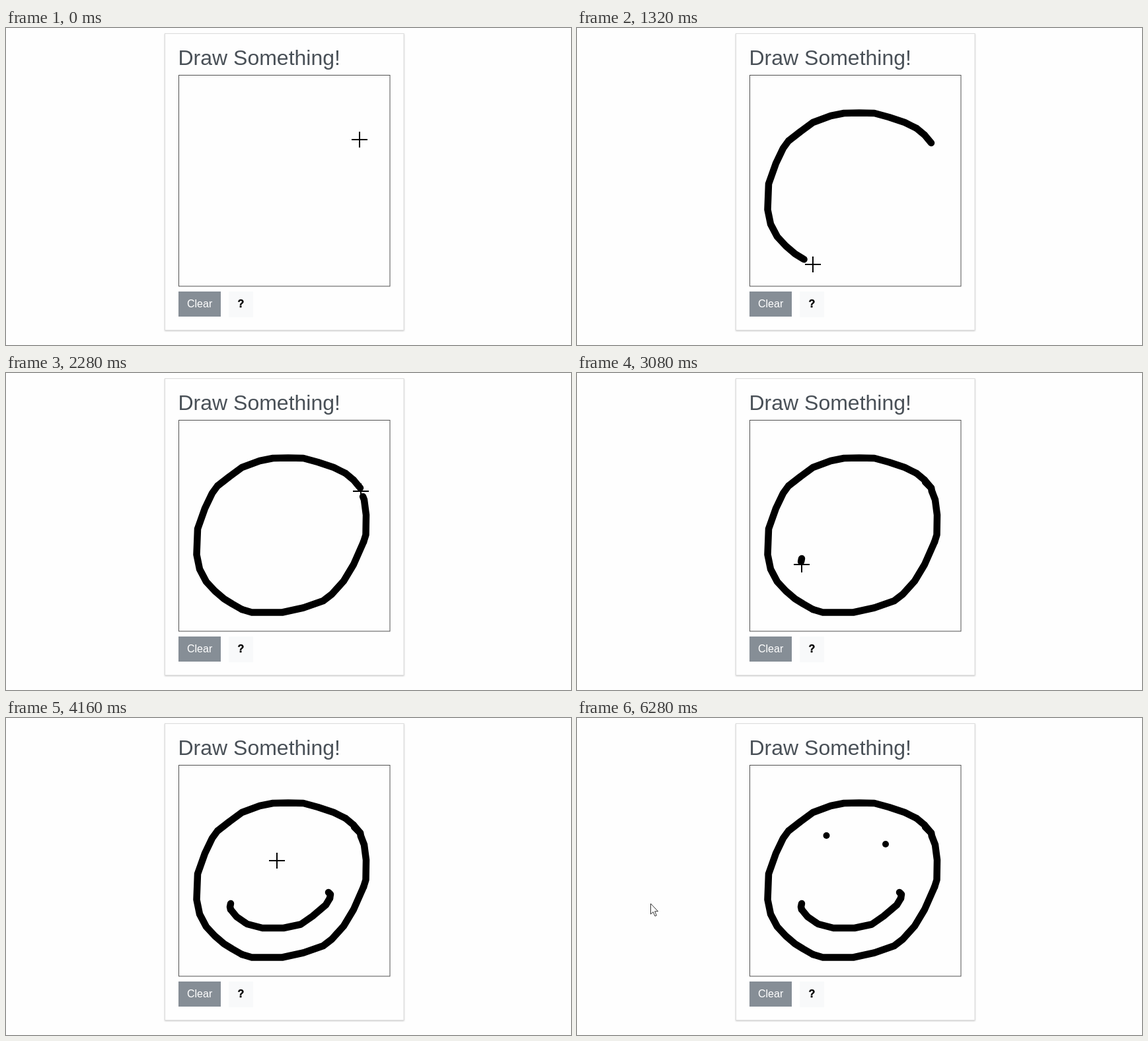
These frames come from a looping animation (855 px wide and 480 px high, 6320 ms). An HTML page:

```html
<!DOCTYPE html>
<html lang="en">
<head>
<meta charset="utf-8">
<title>Drawing pad</title>
<style>
  html, body { margin: 0; width: 100%; height: 100%; overflow: hidden; background: #fefefe; }
  svg { display: block; width: 855px; height: 480px; font-family: "Liberation Sans", Arial, sans-serif; }
  .card { fill: #fefefe; stroke: #dcdcdc; filter: drop-shadow(0 1.5px 1px rgba(0, 0, 0, .2)); }
  .ink path { fill: none; stroke: #000; stroke-width: 10.5; stroke-linecap: round; stroke-linejoin: round; }
</style>
</head>
<body>
<svg viewBox="0 0 855 480">
  <rect class="card" x="240.5" y="8.5" width="361.5" height="449"/>
  <text x="260.5" y="56" font-size="32" fill="#495057">Draw Something!</text>
  <rect x="261.5" y="71.5" width="319.5" height="319.5" fill="#fefefe" stroke="#505050"/>
  <rect x="261" y="399" width="64" height="38" fill="#868e96"/>
  <text x="274" y="423" font-size="16" fill="#fff">Clear</text>
  <rect x="337" y="399" width="37" height="39" fill="#f8f9fa"/>
  <text x="355.3" y="423" font-size="16" font-weight="700" text-anchor="middle" stroke="#000" stroke-width=".4">?</text>
  <g class="ink" id="ink"></g>
  <g id="eyes">
    <circle cx="377.5" cy="178" r="5"/>
    <circle cx="467" cy="191" r="5"/>
  </g>
  <path id="cross" d="M-12 0H12M0-12V12" stroke="#000" stroke-width="2"/>
  <path id="arrow" d="M.5 0V16L4.2 12.6 7 19 9.4 18 6.7 11.8H11.6Z" fill="#fff" stroke="#333"/>
</svg>
<script>
const LOOP = 6320, STEP = 40, LAG = 40, PAD_LEFT = 262;
const EYE_TIMES = [4520, 5320];

// Pointer legs: start, end, route, pen down
const legs = [
  [40, 120, "M535 169L536 174"],
  [120, 1320, "M536 174L526 162 514 152 496 143 472 135 450 129 427 128.5 404 129 384 133 357 143 338 157 320 171 312 182 301 205 290 236 288.5 275 293 297 303 316 316 330 330 342 343 350 357 358", true],
  [1320, 1920, "M357 358L372 362.5 418 362.5 450 355.5 480 345 493 335 511 315 526 290 541 256", true],
  [1920, 2280, "M541 256L544.5 245 545 215 542 192 537 179", true],
  [2280, 2360, "M537 179L536 174 527 165", true],
  [2400, 2560, "M527 165L471 209"],
  [2560, 2920, "M471 209L340 281"],
  [3000, 3080, "M340 281L339 286 340 290", true],
  [3080, 3200, "M340 290L349 301 362 310", true],
  [3200, 3840, "M362 310L365 312 388 318 420 318 446 312.5 464 300 484 283 490 273", true],
  [3840, 3920, "M490 273L491 267 488 264", true],
  [3920, 4160, "M488 264L410 216"],
  [4160, 4480, "M410 216L377 178"],
  [4600, 5080, "M377 178L467 190"],
  [5280, 5320, "M467 190L466 194"],
  [5360, 5920, "M466 194L282 252"],
  [5920, 6280, "M282 252L111 281"]
].map(([start, end, route, pen]) => {
  const path = document.createElementNS("http://www.w3.org/2000/svg", "path");
  path.setAttribute("d", route);
  if (pen) ink.append(path);
  return { start, end, path, pen, length: path.getTotalLength() };
});

const eyeDots = [...eyes.children];
const show = (el, on) => el.setAttribute("visibility", on ? "visible" : "hidden");
const reach = (leg, t) =>
  leg.length * Math.min(1, Math.max(0, (t - leg.start) / (leg.end - leg.start)));

function draw(t) {
  let current = legs[0];
  for (const leg of legs) {
    if (t >= leg.start) current = leg;
    if (!leg.pen) continue;
    // A zero-length dash still leaves a round dot, so wait for the first move.
    const first = leg.start === 120 || leg.start === 3000;
    show(leg.path, first ? t >= leg.start : t > leg.start + LAG);
    leg.path.setAttribute("stroke-dasharray", `${reach(leg, t - LAG)} 9999`);
  }
  eyeDots.forEach((dot, i) => show(dot, t >= EYE_TIMES[i]));

  const { x, y } = current.path.getPointAtLength(reach(current, t));
  const outside = x < PAD_LEFT;
  show(cross, !outside);
  show(arrow, outside);
  (outside ? arrow : cross).setAttribute("transform", `translate(${x} ${y})`);
}

const begin = performance.now();
function tick() {
  const t = (performance.now() - begin) % LOOP;
  draw(t - t % STEP);
  requestAnimationFrame(tick);
}
tick();
</script>
</body>
</html>
```
